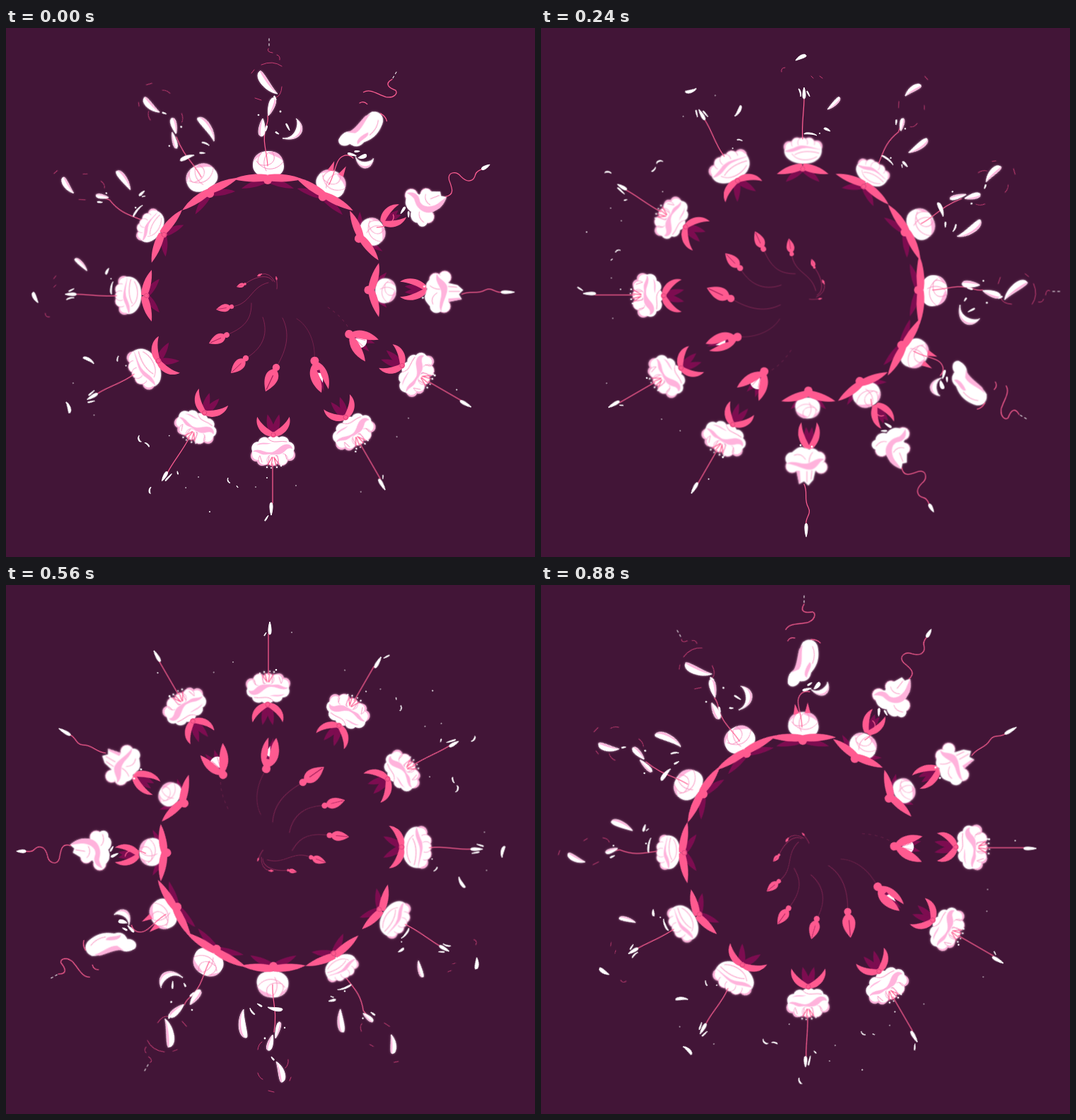
An HTML page for the animation above (0.96 s loop, 748x748 px).

```html
<!DOCTYPE html>
<html lang="en">
<head>
<meta charset="utf-8">
<title>Fuchsia wheel</title>
<style>
  html, body { margin: 0; width: 100%; height: 100%; overflow: hidden; background: #421537; }
  svg { display: block; width: 100%; height: 100%; }
  #wheel { transform-origin: 374px 374.5px; animation: turn .96s steps(12) infinite; }
  @keyframes turn { to { transform: rotate(360deg); } }
  .pink { fill: #ff5a90; }
  .dark { fill: #7d0c50; }
  .white { fill: #fff; }
  .shade { fill: #ffb3dc; }
  .lobes { fill: #fff; stroke: #f9a3cf; stroke-width: .9; }
  .line, .style, .faint, .stem, .dash { fill: none; stroke-linecap: round; }
  .line { stroke: #f985b8; stroke-width: .9; }
  .style { stroke: #ff5f93; stroke-width: 1.25; }
  .faint { stroke: #d8437b; stroke-width: .9; }
  .stem { stroke: #d83d78; stroke-width: 1; }
  .dash { stroke: #fff; stroke-width: 1; stroke-dasharray: 3 4; }
  .petal { fill: #fff; stroke: #fff; stroke-width: 1; stroke-linejoin: round; }
  .glow { filter: drop-shadow(0 0 1.6px rgba(255, 205, 235, .5)); }
</style>
</head>
<body>
<svg viewBox="0 0 748 748" aria-hidden="true">
  <defs>
    <path id="leaf" d="M0-4C13-6 30-6 50 0C34 7 14 8 0 5Z"/>
    <path id="horn" d="M0-3C18 1 34 3 50 0C39 13 13 14 0 4Z"/>
    <g id="bud">
      <path class="pink" d="M0 2C10 7 14 18 0 37C-14 18-10 7 0 2Z"/>
      <circle class="pink" r="5.2"/>
      <path d="M.5 12L0 34" stroke="#9d1c57" stroke-width="1.1"/>
    </g>
    <g id="slit">
      <path class="dark" d="M-7 14L0 45L8 14Z"/>
      <path class="white" d="M-2 17L6 20L2 33Z"/>
      <path class="pink" d="M-3 3C-16 12-15 30-4 46C2 34 0 24-1 14L3 14C2 24 5 34 7 44C15 30 14 12 4 3Z"/>
      <circle class="pink" r="6"/>
    </g>
    <g id="opening">
      <path class="dark" d="M-9 8L-7 37L0 26L7 38L11 8Z"/>
      <path class="white" d="M-10 20L-2 9L8 21C8 29-8 31-10 20Z"/>
      <path class="line" d="M-2 12L-5 25M0 12L4 24"/>
      <path class="pink" d="M-3 2C-16 8-23 21-22 39C-12 32-5 21 0 9C4 22 8 32 14 40C19 25 15 8 4 2Z"/>
      <circle class="pink" r="6"/>
    </g>
    <g id="ball">
      <path class="white" d="M-22-2C-22-14-12-18 0-18C12-18 22-12 22-1C22 12 13 19 0 19C-13 19-21 11-22-2Z"/>
      <path class="shade" d="M-21 4C-15 12-5 12 1 17C-8 21-19 15-21 4ZM10 17C11 12 18 9 21 4C20 11 16 15 10 17Z"/>
      <path class="line" d="M-21 4C-13-8 5-12 17 5M-5 18C-14 7-4-5 13 0C17 5 14 12 9 17M3-9C8 0 7 9 1 16"/>
    </g>
    <g id="half">
      <g class="shade"><circle cx="-19" cy="7" r="8"/><circle cx="20" cy="6" r="8"/></g>
      <g class="lobes">
        <circle cx="-17" cy="6" r="8"/><circle cx="18" cy="5" r="8"/>
        <circle cx="-8" cy="11" r="8"/><circle cx="9" cy="11" r="8"/><circle cx="1" cy="12" r="7"/>
      </g>
      <path class="white" d="M-26 2C-26-13-13-18 0-18C13-18 28-11 27 1C22 10 13 4 7 8C-1 13-9 6-14 8C-21 11-26 8-26 2Z"/>
      <path class="shade" d="M-26 2C-18 1-8 7 4 3C13-1 20-3 27 0C21 2 16 3 10 6C0 11-14 4-26 2Z"/>
      <path class="line" d="M-19-8C-8-15 10-14 16-4M-22-3C-12 0 2 1 12-5"/>
    </g>
    <g id="bloom">
      <g class="shade"><circle cx="-23" cy="8" r="8"/><circle cx="24" cy="7" r="8"/><circle cx="-15" cy="15" r="7"/></g>
      <g class="lobes">
        <circle cx="-21" cy="6" r="8.5"/><circle cx="22" cy="5" r="8.5"/>
        <circle cx="-12" cy="13" r="8"/><circle cx="13" cy="13" r="8.5"/><circle cx="0" cy="14" r="8"/>
      </g>
      <path class="white" d="M-29 1C-32-7-25-13-20-12C-19-18-11-20-7-17C-2-22 5-22 9-18C16-22 23-17 23-12C30-11 33-4 29 2C25 8 20 2 15 4C9 12 1 3-6 8C-14 13-18 5-23 7C-27 8-29 5-29 1Z"/>
      <path class="shade" d="M-28 2C-21-4-13 3-5 3C5 4 9-6 17-8C23-10 28-6 28-2C20-5 19 2 12 5C4 8-2 5-8 6C-17 8-20 1-28 2ZM-23-7C-16-13-8-9-1-10C-8-7-15-10-23-7Z"/>
      <path class="line" d="M-7-17Q-2-11 6-12T20-12M-18 8L-15 17M-5 9L-6 19M7 8L9 19M18 6L20 13"/>
      <path class="style" d="M-1 10L-7 21M0 10L-2 22M2 10L5 22M2 10L9 20"/>
      <g class="white"><circle cx="-8" cy="24" r="1.2"/><circle cx="-2" cy="25" r="1"/><circle cx="6" cy="24" r="1.2"/><circle cx="12" cy="22" r="1.2"/></g>
    </g>
    <g id="lily">
      <g class="lobes"><circle cx="-21" cy="2" r="9"/><circle cx="20" cy="3" r="9"/><circle cx="17" cy="-10" r="9"/></g>
      <path class="white" d="M-3-24C-10-29-18-21-21-18C-28-19-33-10-29-4C-27 3-20 2-15 6L-11 27L-4 23L2 29L9 21L12 8C20 6 25 0 22-5C22-14 12-28 4-22Z"/>
      <path class="shade" d="M-29-2C-20-7-12-2-3-2C6-1 14-13 25-8C17-6 16 3 8 6C-3 9-14-1-29-2ZM-15 8L-10 8L-9 24L-11 27Z"/>
      <path class="line" d="M-18-14Q-8-18-2-8M8-18Q3-12 3-4M0 9L0 24M7 8L6 20"/>
    </g>
    <g id="limp">
      <g class="lobes"><circle cx="-20" cy="-1" r="9"/><circle cx="18" cy="-6" r="9"/><circle cx="9" cy="13" r="8"/></g>
      <path class="white" d="M-2-18C-8-25-18-23-20-18C-28-20-32-11-27-6C-24 0-20 2-17 6C-20 18-16 28-9 36L-4 30L2 32L8 22C13 17 15 10 13 4C20 2 24-4 20-10C17-20 6-22-2-18Z"/>
      <path class="shade" d="M-17 6C-14-4-2-9 8-6C14-4 18-7 24-10C21 1 13 3 7 1C-3-3-11 7-11 20L-9 36C-17 27-20 18-17 6Z"/>
      <path class="line" d="M-7 10Q2 5 9 12M0 15L-2 28M-24-10Q-14-14-8-8"/>
    </g>
  </defs>
  <g id="wheel"></g>
</svg>
<script>
  // Every pose is laid out on the arm that points straight down, then turned into place.
  const MID = 378;
  const use = (id, cls, move) => `<use href="#${id}" class="${cls}" transform="${move}"/>`;
  const path = (cls, d, extra = '') => `<path class="${cls}" d="${d}" ${extra}/>`;
  const put = (id, x, y, s = 1) => use(id, '', `translate(${x} ${y}) scale(${s})`);
  const glow = body => `<g class="glow">${body}</g>`;

  // Mirrored pair of sepals at a knob.
  const pair = (id, cls, x, y, angle, len, width) => [1, -1].map(side =>
    use(id, cls, `translate(${x} ${y}) scale(${side} 1) rotate(${angle}) scale(${len / 50} ${width})`)).join('');

  // Drop from a sharp point to a round end; bend shifts its middle sideways, w sets its thickness.
  function petal(x1, y1, x2, y2, bend = 0, w = 3) {
    const dx = x2 - x1, dy = y2 - y1, len = Math.hypot(dx, dy);
    const at = (u, k) => `${x1 + dx * u - dy / len * k} ${y1 + dy * u + dx / len * k}`;
    const side = (k, end) => end ? [at(1, bend * .6 + k), at(.3, bend + k * .6)] : [at(.3, bend + k * .6), at(1, bend * .6 + k)];
    const shape = (a, b) => `M${x1} ${y1}C${side(a)} ${x2} ${y2}C${side(b, true)} ${x1} ${y1}Z`;
    const body = path('petal', shape(w * .8, -w * .8));
    return w > 5 ? glow(body + path('shade', shape(w * .8, w * .3))) : body;
  }
  const tip = (x, y, len = 18) => petal(x, y + len / 2, x, y - len / 2, 0, 4.2);
  const dot = (x, y, r = .8) => `<circle class="white" cx="${x}" cy="${y}" r="${r}"/>`;

  // arm angle, knob y, sepal angle and length, dark sepal angle and length, bloom, its y and size
  const heads = [
    [0, 513, 17, 40, 46, 36, 'ball', 537, .8],
    [330, 521, 8, 41, 32, 38, 'ball', 543, .9],
    [300, 529, 2, 47, -12, 38, 'ball', 551, .98],
    [270, 534, -2, 49, -18, 39, 'ball', 556, 1],
    [240, 539, -5, 46, -25, 36, 'ball', 564, 1.02],
    [210, 546, -10, 44, -34, 31, 'half', 568, .9],
    [180, 550, -16, 38, -38, 30, 'half', 575, 1],
    [150, 560, -31, 35, -60, 30, 'half', 581, 1.1],
    [120, 568, -47, 35, -74, 29, 'bloom', 590, .97],
    [90, 575, -48, 34, -74, 30, 'bloom', 597, 1],
    [60, 580, -50, 33, -76, 30, 'bloom', 602, 1],
    [30, 587, -54, 33, -76, 31, 'bloom', 609, 1.02]
  ];
  const inner = ([, y, angle, len, dark, darkLen, kind, cy, size]) => {
    const young = kind === 'ball', horn = angle < -20;
    return pair('leaf', 'dark', MID, y, dark, darkLen, .8) +
      glow(put(kind, MID - 1, cy, size)) +
      pair(horn ? 'horn' : 'leaf', 'pink', MID, horn ? y : y + 3, angle, len, .92) +
      `<circle class="pink" cx="${MID}" cy="${y}" r="${young ? 6 : 4}"/>` +
      (young ? '' : `<circle class="faint" cx="${MID}" cy="${y}" r="3"/>`);
  };

  // Everything that trails outward from the head, by arm angle.
  const trails = {
    0: () => pair('leaf', 'dark', 379, 594, -82, 30, .8) + pair('horn', 'pink', 379, 595, -74, 39, .9) +
      glow(put('lily', 376, 618)) + path('style', 'M372 645C378 657 371 666 378 678C383 688 373 692 375 702') + tip(375, 710, 19) +
      dot(367, 590, 1.4) + dot(383, 592, 1.4),
    330: () => pair('leaf', 'dark', 381, 562, 82, 28, .8) + pair('horn', 'pink', 381, 561, 73, 35, -.9) +
      path('style', 'M379 551C372 565 374 579 383 580') + glow(put('limp', 376, 622)) +
      petal(379, 590, 384, 600, 0, 3) + petal(369, 597, 376, 601, 0, 2) +
      path('style', 'M368 657C364 670 374 671 386 673C397 676 393 688 382 690C366 694 369 704 373 708C378 712 376 718 376 721') + tip(376, 727, 13),
    300: () => path('pink', 'M367 568L371 583L375 568ZM383 568L389 581L391 565Z') +
      path('style', 'M379 548C379 568 389 583 382 593Q377 600 368 598') +
      petal(367, 602, 343, 612, 18, 9) + petal(362, 602, 354, 611, 1, 5) + petal(366, 603, 378, 600, 0, 3) +
      petal(365, 611, 371, 607, 0, 2) +
      glow(path('white', 'M357 663C353 646 358 634 366 625C368 614 376 612 382 613C387 603 397 604 399 610C400 622 394 629 385 631C383 643 385 656 378 668C369 675 360 671 357 663Z') +
        path('shade', 'M378 665C381 650 377 640 383 630L394 625C386 632 386 648 383 658ZM372 618C379 621 373 634 368 640C363 635 371 628 372 618Z') +
        path('line', 'M364 638Q359 651 364 662')) +
      path('style', 'M353 667Q357 672 366 672M389 674Q396 676 399 670M402 686C396 696 383 693 371 696C360 700 359 709 364 711C374 709 380 711 378 718L376 722') +
      path('dash', 'M376 724V735'),
    270: () => path('style', 'M378 554C379 574 386 588 381 608Q377 617 378 625') +
      petal(357, 593, 338, 621, 22, 9) + petal(385, 621, 387, 596, 0, 9) + petal(377, 625, 369, 650, 0, 9) +
      petal(364, 656, 389, 688, -7, 11) + petal(381, 603, 379, 611, 0, 2) + petal(366, 647, 369, 653, 0, 2) +
      petal(347, 604, 352, 614, 0, 2) + petal(362, 599, 367, 602, 0, 2) + dot(360, 631, 1.4) + dot(391, 626, 1.3) +
      path('faint', 'M358 666Q359 653 366 651M387 647L396 650M358 695Q371 704 387 697M397 690L401 685M361 704Q360 710 365 711M371 714Q380 715 377 720') +
      path('dash', 'M376 724V736'),
    240: () => path('style', 'M377 565C376 589 384 601 379 632') +
      petal(382, 674, 390, 703, -5, 9) + petal(377, 636, 371, 658, 0, 8) + petal(336, 600, 340, 640, 7, 10) +
      petal(370, 597, 391, 600, 2, 5) + petal(381, 641, 387, 618, 0, 6) + petal(345, 598, 352, 607, 2, 2) +
      petal(375, 667, 379, 672, 0, 2) + petal(355, 592, 362, 596, 0, 2) + dot(366, 641, 1.4) + dot(394, 626, 1.2) +
      path('faint', 'M356 657Q357 649 362 646M399 671Q400 678 395 683M356 690Q358 697 363 699M371 715L379 717M401 701L403 696'),
    210: () => path('style', 'M376 585C379 605 382 617 374 637L376 650') +
      petal(347, 619, 334, 649, 3, 9) + petal(391, 686, 379, 710, -4, 8) + petal(372, 640, 378, 657, 0, 6) +
      petal(338, 601, 348, 604, 0, 3) + petal(357, 593, 378, 596, 3, 2) + petal(382, 644, 385, 651, 0, 2) +
      petal(344, 596, 347, 600, 0, 1) + dot(365, 600, 1.2) + dot(368, 646, 1.2) +
      path('faint', 'M357 661Q358 653 363 652M395 675L391 667M358 683L361 688M375 722L381 724'),
    180: () => path('style', 'M378 592C380 611 376 631 376 650') + tip(376, 657, 16) +
      petal(343, 634, 326, 651, 2, 6) + petal(388, 703, 373, 710, -2, 5) + petal(339, 603, 348, 607, 1, 3) +
      petal(358, 597, 376, 599, 3, 2) + petal(381, 652, 384, 663, 2, 1.5) + petal(368, 652, 372, 660, 0, 1.5) +
      dot(354, 600, 1) + path('faint', 'M403 693Q409 693 408 687M366 681L363 678M350 678L354 681'),
    150: () => path('style', 'M377 599C380 620 374 637 375 657') + tip(375, 666, 17) +
      petal(336, 641, 321, 650, 3, 4) + petal(363, 702, 379, 706, -3, 4) + petal(382, 666, 379, 676, 0, 1.5) +
      petal(369, 659, 371, 670, 0, 1.5) + petal(344, 605, 350, 610, 2, 1.3) + dot(361, 603, 1) + dot(399, 677) + dot(345, 680),
    120: () => path('style', 'M377 609C378 632 374 650 375 668') + tip(374, 674, 15) +
      petal(314, 642, 321, 648, 4, 1.4) + petal(326, 647, 334, 649, -2, 1.2) + petal(365, 697, 369, 705, 3, 1.6) +
      petal(381, 666, 378, 679, 0, 1.5) + petal(386, 659, 389, 662, 0, 1) + dot(351, 621) + dot(416, 651) + dot(408, 673),
    90: () => path('style', 'M377 616V672') + tip(375, 680) +
      petal(314, 636, 317, 643, 3, 1) + petal(326, 647, 328, 650, 0, .6) + petal(371, 689, 366, 697, 0, 1.6) +
      dot(353, 649) + dot(410, 647) + dot(288, 684, 1) + dot(369, 636, 1),
    60: () => path('style', 'M377 622V680') + tip(375, 688) + petal(380, 682, 383, 677, 0, 1) + dot(366, 629, 1.3) + dot(344, 682) + dot(427, 640),
    30: () => path('style', 'M377 630V684') + tip(376, 692) + dot(363, 628, 1.5) + dot(389, 634, 1.5) + dot(318, 632) + dot(387, 671, 1)
  };

  // Young buds at the hub: knob, point, stem, stem opacity.
  const buds = [
    [382, 480, 367, 514, 'C399 452 401 430 391 410', .4],
    [339, 467, 318, 488, 'C367 451 370 428 363 409', .4],
    [312, 434, 287, 446, 'C342 422 347 408 347 389', .4],
    [319, 394, 297, 398, 'C347 391 345 366 371 360', .45],
    [338, 362, 326, 366, 'C354 350 372 348 377 358', .55],
    [361, 348, 355, 351, 'Q373 345 380 359', .55],
    [382, 352, 383, 357, 'Q384 363 383 369', .5]
  ];
  const bud = ([x, y, px, py, stem, alpha]) => {
    const dx = px - x, dy = py - y, turn = Math.atan2(dy, dx) * 180 / Math.PI - 90;
    return path('stem', `M${x} ${y}${stem}`, `opacity="${alpha}"`) +
      use('bud', '', `translate(${x} ${y}) rotate(${turn}) scale(${Math.hypot(dx, dy) / 37})`);
  };

  const arm = (angle, body) => `<g transform="rotate(${angle - 90} 374 374.5)">${body}</g>`;
  document.getElementById('wheel').innerHTML =
    path('stem', 'M436 468C438 446 428 421 411 411', 'opacity=".3"') +
    path('stem', 'M487 430C479 411 464 401 451 392', 'opacity=".3" stroke-dasharray="3 6"') +
    buds.map(bud).join('') +
    arm(60, use('slit', '', 'translate(380 489) rotate(13)')) +
    arm(30, put('opening', 379, 500)) +
    heads.map(h => arm(h[0], inner(h))).join('') +
    heads.map(([a]) => arm(a, trails[a]())).join('');
</script>
</body>
</html>
```
